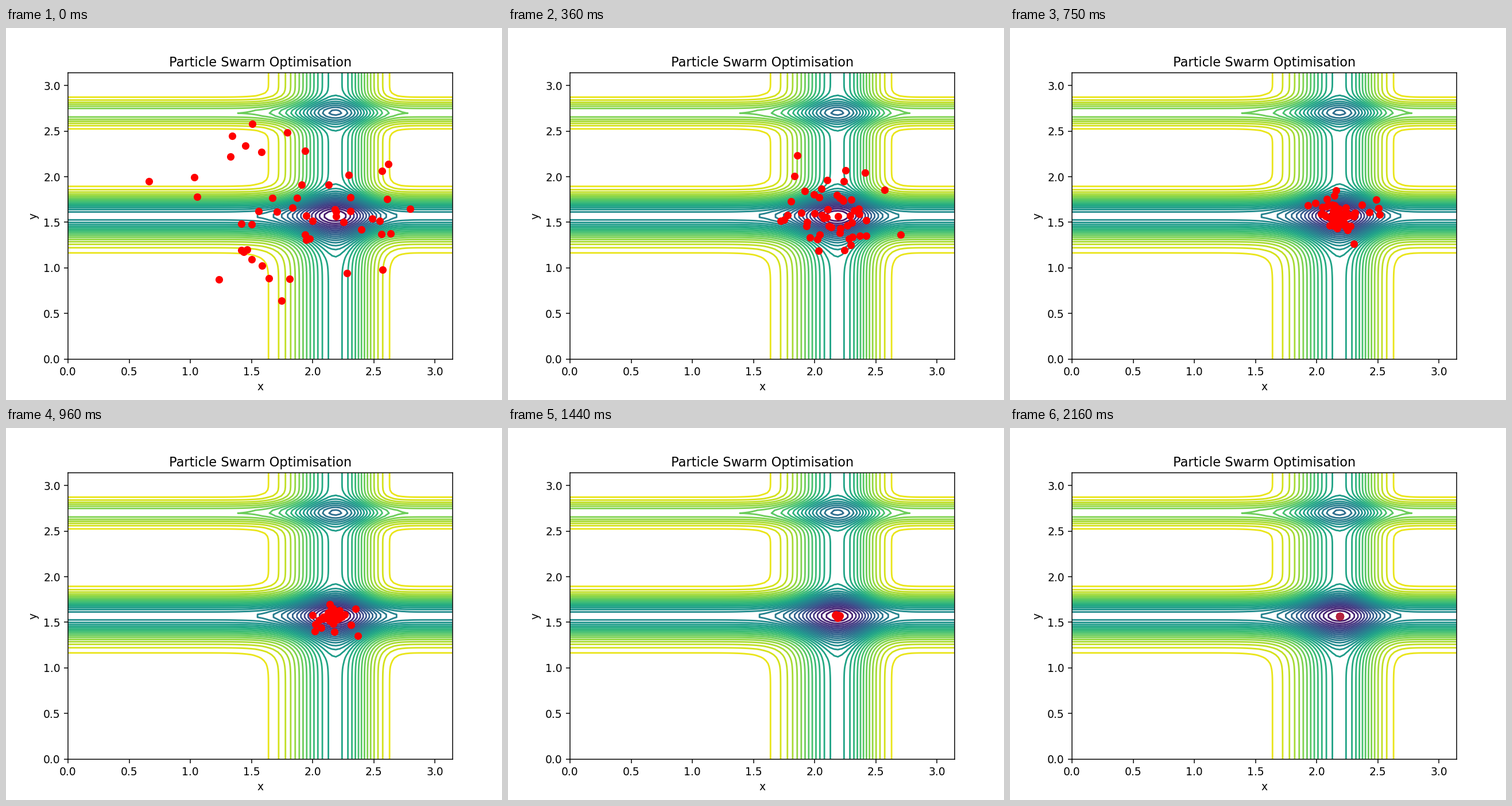
These frames come from a looping animation (864 px wide and 648 px high, 3.05 s). A matplotlib script:

```python
import matplotlib.pyplot as plt
import numpy as np
from matplotlib.animation import FuncAnimation
from matplotlib.colors import to_rgb

W, H, DPI = 864, 648, 135
TICK, LOOP = 10, 3050            # ms
STEP, LAST = 30, 72              # ms per swarm step, final step
COUNT = 50
BEST = np.array([574.5, 327.6])  # optimum, in stage pixels


def michalewicz(x, y, m=5):
    return -(np.sin(x) * np.sin(x**2 / np.pi)**(2 * m)
             + np.sin(y) * np.sin(2 * y**2 / np.pi)**(2 * m))


fig, ax = plt.subplots(figsize=(W / DPI, H / DPI), dpi=DPI)
grid = np.linspace(0, np.pi, 100)
X, Y = np.meshgrid(grid, grid)
ax.contour(X, Y, michalewicz(X, Y), 30)
ax.set(title="Particle Swarm Optimisation", xlabel="x", ylabel="y")

# The landscape never changes, so render it once and reuse the image.
fig.canvas.draw()
backdrop = np.array(fig.canvas.buffer_rgba())
ax.set_visible(False)
fig.figimage(backdrop, zorder=-1)

stage = fig.add_axes([0, 0, 1, 1], xlim=(0, W), ylim=(H, 0))
stage.axis("off")
dots, = stage.plot([], [], "ro")

# Scatter over the plot, pulled part of the way towards the optimum.
rng = np.random.default_rng(7)
pull = np.sqrt(rng.uniform(0, 1, (COUNT, 1)))
offset = (rng.uniform((200, 110), (725, 505), (COUNT, 2)) - BEST) * pull
swing = rng.normal(0, (115, 85), (COUNT, 2))
speed = rng.uniform(0.3, 1.3, (COUNT, 2))
rate = rng.uniform(0.6, 1.6, (COUNT, 1))


def swarm(k):
    """Damped orbits: a quick first pull, then accelerating collapse."""
    decay = 0.8 * (1 - np.exp(-k / 5)) + (k / 29)**3
    orbit = offset * np.cos(speed * k) + swing * np.sin(speed * k)
    pos = BEST + orbit * np.exp(-rate * decay)
    return np.clip(pos, (112, 82), (773, 572))


def tint(k):
    """Red, deepening to crimson once the dots have merged."""
    mix = np.clip((k - 46) / 14, 0, 1)
    red, crimson = np.array(to_rgb("red")), np.array(to_rgb("#b4223e"))
    return red + (crimson - red) * mix


def update(i):
    k = min(i * TICK // STEP, LAST)
    pts = np.vstack([swarm(k), BEST])
    dots.set_data(pts[:, 0], pts[:, 1])
    dots.set_color(tint(k))
    return dots,


anim = FuncAnimation(fig, update, frames=LOOP // TICK, interval=TICK,
                     repeat=True, repeat_delay=0)
plt.show()
```
